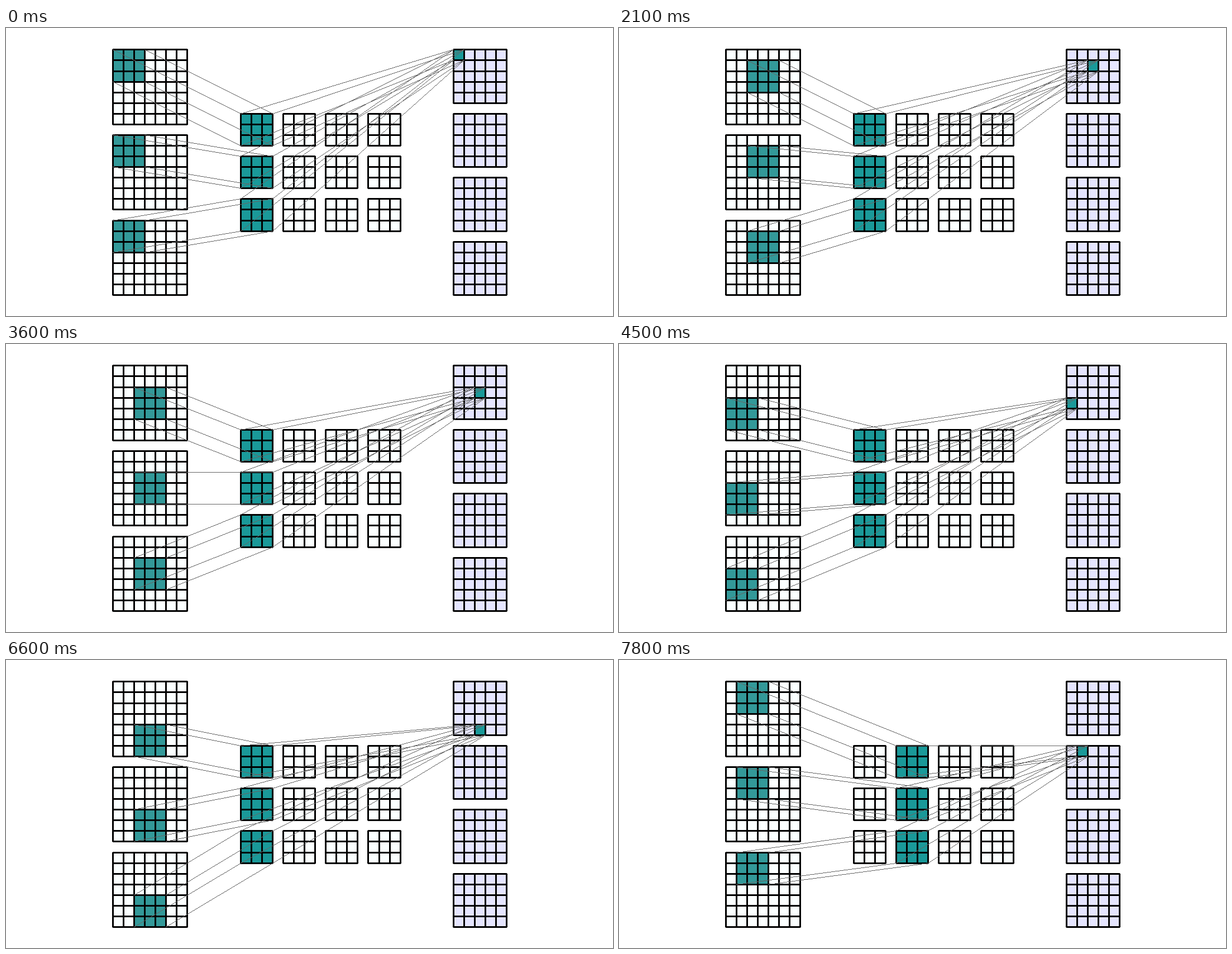
Animation, 1087 px wide and 515 px high, one loop 8000 ms. Source, as an HTML page with a canvas:

```html
<!DOCTYPE html>
<html lang="en">
<head>
<meta charset="utf-8">
<title>Convolution with four filters</title>
<style>
  html, body { margin: 0; width: 100%; height: 100%; overflow: hidden; background: #fff; }
  canvas { display: block; }
</style>
</head>
<body>
<canvas id="stage" width="1087" height="515"></canvas>
<script>
const ctx = document.getElementById("stage").getContext("2d");
const LOOP = 8000, STEP = 300;
const UNIT = 19.07;
const CHANNELS = 3, FILTERS = 4, IN = 7, KERNEL = 3, OUT = 5;

const PAPER = "#fbffff", LILAC = "#e5e5ff";
const WINDOW = "#339999", ACTIVE = "#1a9999", RAY = "#666";

// Unit coordinates to whole pixels
const px = u => Math.round(190.8 + u * UNIT);
const py = v => Math.round(38.4 + v * UNIT);

function fillCells(u, v, size, color) {
  ctx.fillStyle = color;
  ctx.fillRect(px(u), py(v), px(u + size) - px(u), py(v + size) - py(v));
}

// Three-pixel rules with the corner pixels left off
function drawRules(u, v, size) {
  const left = px(u), top = py(v);
  const width = px(u + size) - left + 1, height = py(v + size) - top + 1;
  ctx.fillStyle = "#000";
  for (let i = 0; i <= size; i++) {
    ctx.fillRect(px(u + i) - 1, top, 3, height);
    ctx.fillRect(left, py(v + i) - 1, width, 3);
  }
}

// Hard-edged line, one pixel wide
function drawRay(x0, y0, x1, y1) {
  const n = Math.max(Math.abs(x1 - x0), Math.abs(y1 - y0));
  for (let i = 0; i <= n; i++) {
    const t = i / n;
    ctx.fillRect(Math.round(x0 + (x1 - x0) * t), Math.round(y0 + (y1 - y0) * t), 1, 1);
  }
}

function joinCorners(a, b) {
  ctx.fillStyle = RAY;
  for (const i of [0, 1])
    for (const j of [0, 1])
      drawRay(px(a.u + i * a.size), py(a.v + j * a.size),
              px(b.u + i * b.size), py(b.v + j * b.size));
}

function draw(step) {
  const filter = Math.floor(step / (OUT * OUT));
  const col = step % OUT;
  const row = Math.floor(step / OUT) % OUT;
  const result = { u: 32 + col, v: filter * 6 + row, size: 1 };
  const links = [];

  ctx.fillStyle = "#fff";
  ctx.fillRect(0, 0, 1087, 515);

  for (let c = 0; c < CHANNELS; c++) {
    const patch = { u: col, v: c * 8 + row, size: KERNEL };
    fillCells(0, c * 8, IN, PAPER);
    fillCells(patch.u, patch.v, KERNEL, WINDOW);
    drawRules(0, c * 8, IN);

    for (let f = 0; f < FILTERS; f++) {
      const kernel = { u: 12 + f * 4, v: 6 + c * 4, size: KERNEL };
      fillCells(kernel.u, kernel.v, KERNEL, f === filter ? ACTIVE : PAPER);
      drawRules(kernel.u, kernel.v, KERNEL);
      if (f === filter) links.push([patch, kernel], [kernel, result]);
    }
  }

  for (let f = 0; f < FILTERS; f++) {
    fillCells(32, f * 6, OUT, LILAC);
    if (f === filter) fillCells(result.u, result.v, 1, ACTIVE);
    drawRules(32, f * 6, OUT);
  }

  for (const [from, to] of links) joinCorners(from, to);
}

const start = performance.now();
let shown = -1;
function tick() {
  const step = Math.floor(((performance.now() - start) % LOOP) / STEP);
  if (step !== shown) draw(shown = step);
  requestAnimationFrame(tick);
}
tick();
</script>
</body>
</html>
```
